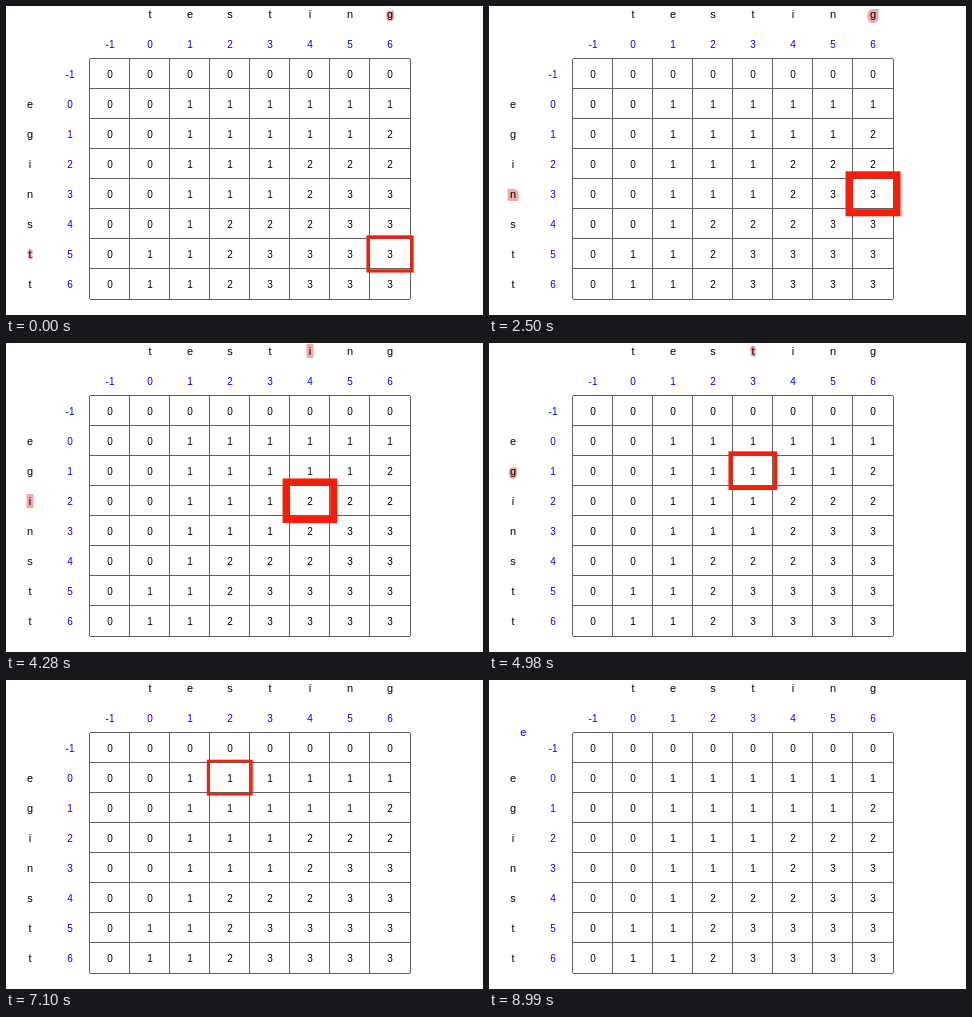
An HTML page that plays this animation: 477 px wide and 309 px high, repeating every 9.03 s.

```html
<!DOCTYPE html>
<html lang="en">
<head>
<meta charset="utf-8">
<title>Longest common subsequence</title>
<style>
  html, body { margin: 0; width: 100%; height: 100%; overflow: hidden; background: #fff; }
  svg { display: block; width: 477px; height: 309px; }
  text { font: 11px "Liberation Sans", Arial, sans-serif; text-anchor: middle; fill: #000; }
  .num { font-size: 10px; }
  .blue { fill: #00f; }
  .grid { stroke: #606060; stroke-width: 1; fill: none; shape-rendering: crispEdges; }
  #ring { fill: none; stroke: #f91c06; }
  .glow { fill: #f08080; stroke: #f08080; opacity: .68; }
</style>
</head>
<body>
<svg id="stage" viewBox="0 0 477 309"></svg>
<script>
const LOOP = 9030;
const MISS = 1150, MATCH = 780;            // time spent on a cell
const GLOW_ON = 230, GLOW_OFF = 650, MATCH_OFF = 690;
const across = "testing", down = "eginstt";
const LEFT = 83.5, TOP = 52.5, STEP_X = 40.07, STEP_Y = 30.07;
const stage = document.getElementById("stage");

const colX = c => 144 + 40 * c;            // index -1 is the first column
const rowY = r => 98.5 + 30 * r;

function set(el, attrs) {
  for (const key in attrs) el.setAttribute(key, attrs[key]);
}
function add(tag, attrs, content = "") {
  const el = document.createElementNS(stage.namespaceURI, tag);
  set(el, attrs);
  el.textContent = content;
  return stage.appendChild(el);
}
const label = (x, y, s, cls = "") => add("text", { x, y, class: cls }, s);
const show = (el, on) => el.style.display = on ? "" : "none";

// Subsequence lengths, with a border of zeros at index -1
const memo = {};
function len(r, c) {
  if (r < 0 || c < 0) return 0;
  return memo[[r, c]] ??= down[r] === across[c]
    ? len(r - 1, c - 1) + 1
    : Math.max(len(r - 1, c), len(r, c - 1));
}

// Walk back through the table, timing each visit
const visits = [];
let clock = -380;
for (let r = 5, c = 6; r >= 0 && c >= 0;) {
  const match = down[r] === across[c];
  const start = clock;
  clock += match ? MATCH : MISS;
  visits.push({ r, c, match, start, end: clock });
  if (match) { r--; c--; }
  else if (len(r - 1, c) >= len(r, c - 1)) r--;
  else c--;
}

let lines = "";
for (let i = 0; i <= 8; i++) {
  lines += `M${LEFT + STEP_X * i} ${TOP}v${STEP_Y * 8}`;
  lines += `M${LEFT} ${TOP + STEP_Y * i}h${STEP_X * 8}`;
}
add("path", { d: lines, class: "grid" });

const ring = add("rect", { id: "ring" });
const glows = [0, 1].map(() => label(0, 0, "", "glow"));

for (let i = -1; i < 7; i++) {
  label(colX(i), 42, i, "num blue");
  label(64, rowY(i) + 3.5, i, "num blue");
  if (i >= 0) {
    label(colX(i), 12, across[i]);
    label(24, rowY(i) + 3.5, down[i]);
  }
  for (let j = -1; j < 7; j++) label(colX(j), rowY(i) + 3.5, len(i, j), "num");
}
const result = label(34.3, 55.5, "e", "blue");

function placeGlow(el, ch, x, y, width) {
  el.textContent = ch;
  set(el, { x, y, "stroke-width": width });
}

function draw(t) {
  const weight = 4.8 + 2.4 * Math.cos(2 * Math.PI * (t - 2545) / 1870);
  const v = visits.find(p => t < p.end);
  show(ring, v);
  show(result, t >= 8930);
  const age = v ? t - v.start : 0;
  const lit = v && age >= GLOW_ON && age < (v.match ? MATCH_OFF : GLOW_OFF);
  glows.forEach(g => show(g, lit));
  if (!v) return;

  const out = 0.3 + weight / 2;
  set(ring, {
    x: LEFT + STEP_X * (v.c + 1) - out, y: TOP + STEP_Y * (v.r + 1) - out,
    width: STEP_X + 2 * out, height: STEP_Y + 2 * out, "stroke-width": weight
  });
  const halo = weight * 0.86;
  placeGlow(glows[0], across[v.c], colX(v.c), 12, halo);
  placeGlow(glows[1], down[v.r], 24, rowY(v.r) + 3.5, halo);
}

const began = performance.now();
function tick() {
  draw((performance.now() - began) % LOOP);
  requestAnimationFrame(tick);
}
tick();
</script>
</body>
</html>
```
